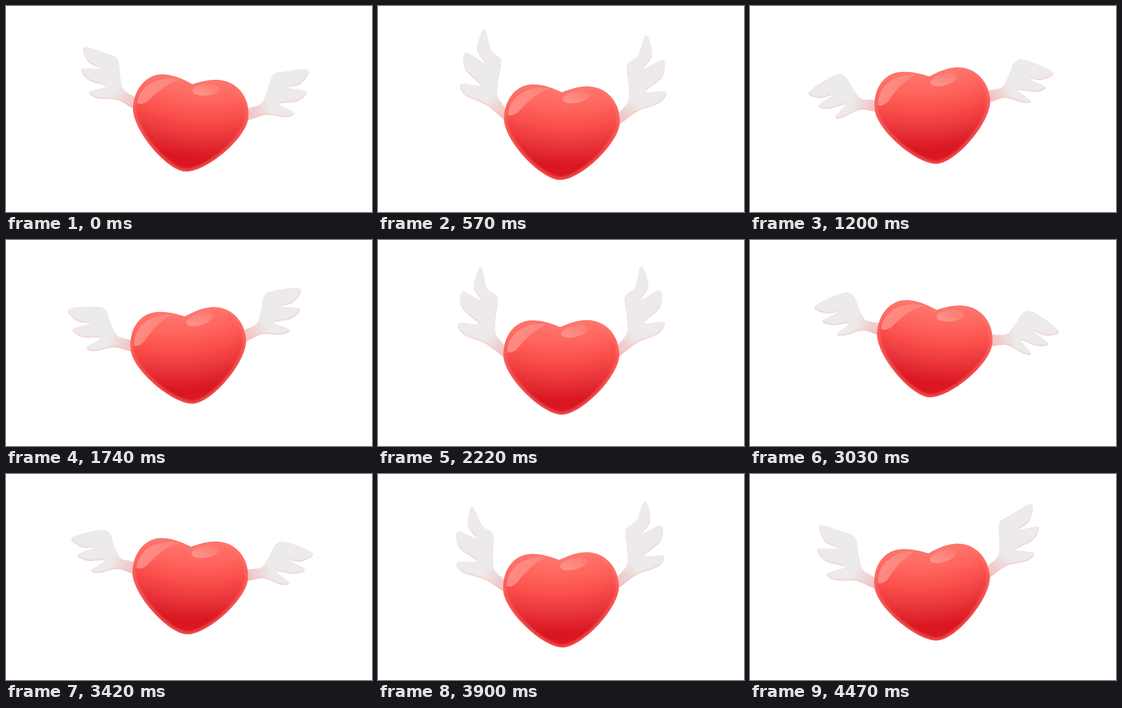
Write an HTML page with a canvas that moves like this. It is 640x360 px and loops after 4.5 s.

```html
<!DOCTYPE html>
<html lang="en">
<head>
<meta charset="utf-8">
<title>Flying heart</title>
<style>
  html, body { margin: 0; width: 100%; height: 100%; overflow: hidden; background: #fff; }
  canvas { display: block; width: 640px; height: 360px; }
</style>
</head>
<body>
<canvas id="stage" width="640" height="360"></canvas>
<script>
const ctx = document.getElementById('stage').getContext('2d');
const LOOP = 4500, STEP = 30, FLAP = 1800, SWAY = 3000;
const TILT = 0.101, BOB = 15.8, CX = 321, CY = 207;

// Wing joint on the heart; other wing points are polar around it, in degrees.
const ROOT = { x: 100, y: -27 };
const EDGE = [[47, 31], [58, 55], [65, 84], [57, 101]];
const EDGE_SWING = 20;
const FEATHERS = [
  { angle: 44, reach: 134, swing: 33, notch: 0.635 },
  { angle: 29, reach: 112, swing: 29, notch: 0.52 },
  { angle: 10, reach: 82, swing: 25, notch: 0.38 }
];

// Closed Catmull-Rom curve through a list of points.
function smooth(points) {
  const at = i => points[(i + points.length) % points.length];
  const path = new Path2D();
  path.moveTo(...points[0]);
  points.forEach((b, i) => {
    const a = at(i - 1), c = at(i + 1), d = at(i + 2);
    path.bezierCurveTo(
      b[0] + (c[0] - a[0]) / 6, b[1] + (c[1] - a[1]) / 6,
      c[0] - (d[0] - b[0]) / 6, c[1] - (d[1] - b[1]) / 6, ...c);
  });
  path.closePath();
  return path;
}

// The wing swings and stretches with the flap; the cosine terms make it lag.
function wingShape(phase) {
  const sin = Math.sin(phase), cos = Math.cos(phase);
  const stretch = 1 + 0.15 * sin - 0.025 * cos;
  const lag = 1.7 * Math.cos(2 * phase) - 3.3 * cos;
  const point = (angle, reach, swing) => {
    const a = (angle + swing * sin + lag) * Math.PI / 180, r = reach * stretch;
    return [ROOT.x + r * Math.cos(a), ROOT.y - r * Math.sin(a)];
  };
  return smooth([
    [ROOT.x - 2, ROOT.y - 9],
    ...EDGE.map(([angle, reach]) => point(angle, reach, EDGE_SWING)),
    ...FEATHERS.flatMap(({ angle, reach, swing, notch }) => [
      point(angle, reach, swing),
      point(angle - 6, reach * 0.82, swing * 0.9),
      point(angle - 2, reach * notch, swing * 0.8)
    ]),
    [ROOT.x - 2, ROOT.y + 9]
  ]);
}

function withStops(gradient, stops) {
  stops.forEach(([offset, color]) => gradient.addColorStop(offset, color));
  return gradient;
}

const blush = withStops(ctx.createRadialGradient(ROOT.x, ROOT.y, 4, ROOT.x, ROOT.y, 42),
  [[0, 'rgba(250,150,150,.45)'], [1, 'rgba(250,150,150,0)']]);

function drawWing(path, side) {
  ctx.save();
  ctx.scale(side, 1);
  ctx.strokeStyle = 'rgba(255,150,150,.3)';
  ctx.stroke(path);
  ctx.fillStyle = '#f6b4b4';
  ctx.fill(path);
  ctx.clip(path);
  // Shifted layers leave a soft red reflection on the undersides.
  ctx.fillStyle = 'rgba(237,235,235,.55)';
  for (let lift = 0; lift < 6; lift++) {
    ctx.fill(path);
    ctx.translate(0, -1);
  }
  ctx.translate(0, 6);
  ctx.fillStyle = blush;
  ctx.fill(path);
  ctx.restore();
}

function heartShape() {
  const path = new Path2D();
  path.moveTo(-2, -70.5);
  path.bezierCurveTo(12, -76, 26, -82.5, 45, -82.5);
  path.bezierCurveTo(77, -82.5, 101, -56, 101, -22);
  path.bezierCurveTo(101, 16, 34, 82.5, 0, 82.5);
  path.bezierCurveTo(-34, 82.5, -101.5, 16, -101.5, -22);
  path.bezierCurveTo(-101.5, -56, -81, -82.5, -51, -82.5);
  path.bezierCurveTo(-32, -82.5, -16, -76, -2, -70.5);
  return path;
}

const heart = heartShape();
const gloss = new Path2D(
  'M-95-28C-93-60-66-80-24-76C-50-66-66-46-78-32Q-90-24-95-28Z');
const body = withStops(ctx.createRadialGradient(0, -300, 216, 0, -300, 382), [
  [0, '#fb7a70'], [0.25, '#ff655d'], [0.45, '#f94e4a'],
  [0.65, '#e9343a'], [0.85, '#d91721'], [1, '#dc1822']]);
const shine = withStops(ctx.createLinearGradient(-92, -30, -30, -76),
  [[0, 'rgba(255,205,195,.45)'], [1, 'rgba(255,200,192,.2)']]);
const spot = withStops(ctx.createLinearGradient(20, -52, 26, -74),
  [[0, 'rgba(255,205,198,.4)'], [1, 'rgba(255,205,198,.12)']]);

function drawHeart() {
  ctx.fillStyle = body;
  ctx.fill(heart);
  ctx.save();
  ctx.clip(heart);
  ctx.strokeStyle = 'rgba(255,120,110,.16)';
  for (let width = 2; width <= 14; width += 3) {
    ctx.lineWidth = width;
    ctx.stroke(heart);
  }
  ctx.restore();
  ctx.fillStyle = shine;
  ctx.fill(gloss);
  ctx.fillStyle = spot;
  ctx.beginPath();
  ctx.ellipse(23, -63, 24, 10, -0.2, 0, Math.PI * 2);
  ctx.fill();
}

function draw(t) {
  const phase = 2 * Math.PI * t / FLAP;
  const wing = wingShape(phase);
  ctx.fillStyle = '#fff';
  ctx.fillRect(0, 0, 640, 360);
  ctx.save();
  ctx.translate(CX, CY + BOB * Math.sin(phase));
  ctx.rotate(TILT * Math.cos(2 * Math.PI * t / SWAY));
  drawWing(wing, -1);
  drawWing(wing, 1);
  drawHeart();
  ctx.restore();
}

const start = performance.now();
function tick() {
  const t = (performance.now() - start) % LOOP;
  draw(Math.floor(t / STEP) * STEP);
  requestAnimationFrame(tick);
}
tick();
</script>
</body>
</html>
```
